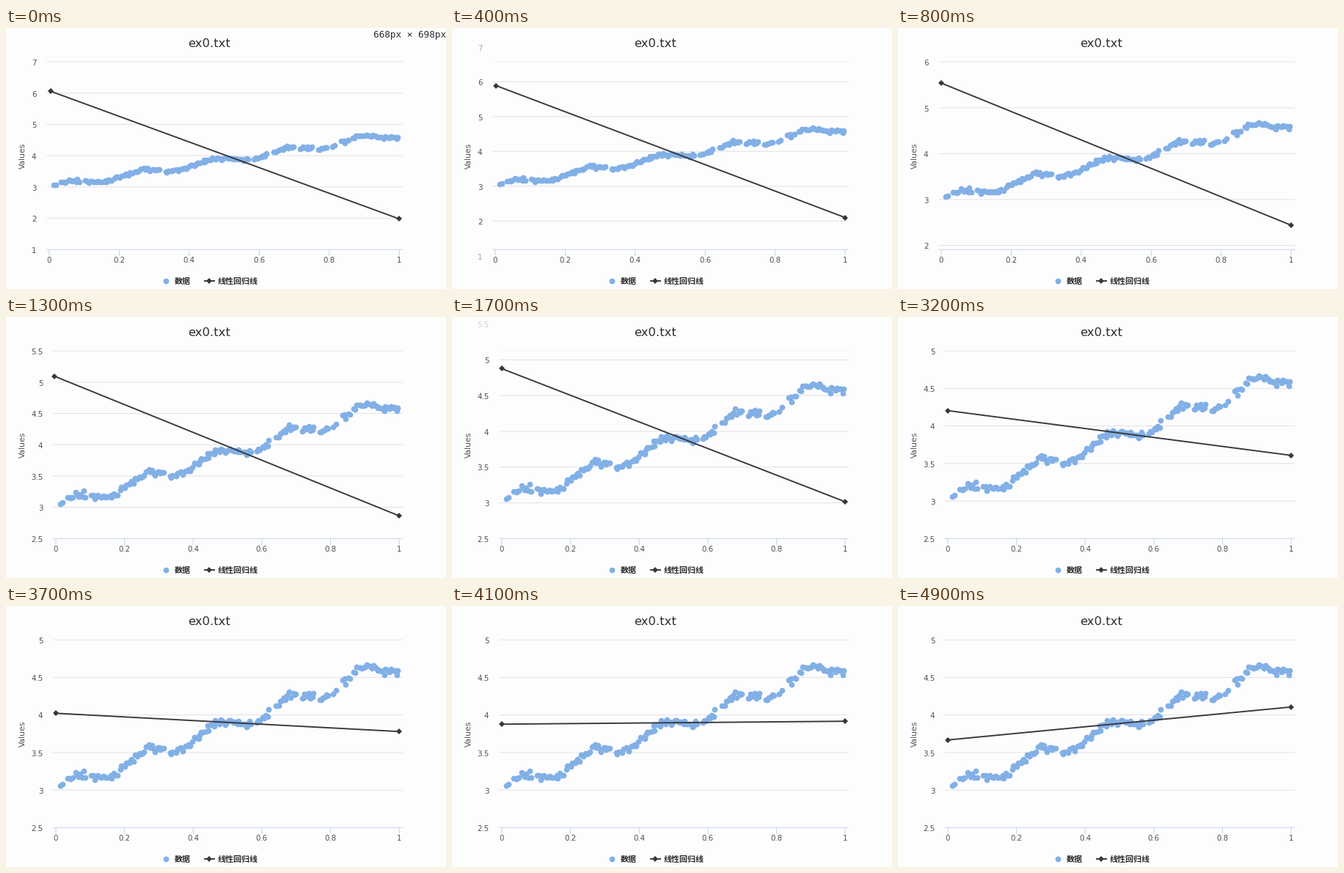
A matplotlib script for the animation above (5000 ms loop, 600x356 px).

```python
import numpy as np
import matplotlib.pyplot as plt
from matplotlib.animation import FuncAnimation

W, H, DPI = 600, 356, 100
FRAMES, STEP = 50, 100
PT = 72 / DPI
TOP, BOTTOM, RIGHT = 46.2, 302.2, 536.2
BLUE, DARK, INK = "#82b0e6", "#37373c", "#2d2d30"
GREY, GRID, AXIS, PAPER = "#505054", "#e2e2e6", "#c6d3ea", "#fdfdfe"

# Empty stretches of the cloud, as x positions on the stage
GAPS = [(77, 83), (109, 115), (216, 223), (335, 341), (360, 366),
        (398, 403), (420, 427), (441, 446), (451, 458), (469, 473)]

# Regression line: time in seconds, value at x = 0, value at x = 1
LINE_KEYS = [(0, 6.06, 1.98), (0.4, 5.89, 2.10), (1.3, 5.096, 2.863),
             (2.3, 4.546, 3.242), (3.2, 4.204, 3.608), (4.1, 3.877, 3.916),
             (4.9, 3.667, 4.106)]
LINE_T, LINE_LEFT, LINE_RIGHT = zip(*LINE_KEYS)


def make_cloud():
    """A rising sine wave with a little noise and a few gaps."""
    rng = np.random.default_rng(11)
    px = np.linspace(74.5, 534.5, 190)
    px += rng.uniform(-1, 1, px.size)
    for start, end in GAPS:
        px = px[(px < start) | (px > end)]
    x = (px - 68) / (RIGHT - 68)
    noise = np.clip(rng.normal(0, 0.028, x.size), -0.055, 0.055)
    return x, 3.005 + 1.7 * x + 0.1 * np.sin(30 * x) + noise


CLOUD_X, CLOUD_Y = make_cloud()


def ramp(t, start, end):
    return float(np.clip((t - start) / (end - start), 0, 1))


def zoom(t):
    """Progress of the change from whole to half steps on the y axis."""
    return ramp(t, 0.9, 1.25)


def axis_range(t):
    low = 1 + ramp(t, 0.3, 0.85) + 0.5 * zoom(t)
    high = 7 - ramp(t, 0.1, 0.8) - 0.5 * zoom(t) - 0.5 * ramp(t, 1.4, 1.8)
    return low, high


def tick_alpha(value, t):
    if value in (1, 7):
        return 1 - ramp(t, 0.2, 0.6)
    if value in (2, 6):
        return 1 - zoom(t)
    if value == 5.5:
        return zoom(t) * (1 - ramp(t, 1.4, 1.8))
    if value % 1:
        return zoom(t) if 2.5 <= value <= 5 else 0
    return 1


fig = plt.figure(figsize=(W / DPI, H / DPI), dpi=DPI, facecolor=PAPER)
ax = fig.add_axes([0, 0, 1, 1])


def text(x, y, s, px, color=GREY, font="DejaVu Sans", ha="center", **kw):
    ax.text(x, y, s, fontsize=px * PT, color=color, family=font, ha=ha,
            va=kw.pop("va", "baseline"), **kw)


def line(xs, ys, color, width=1, **kw):
    ax.plot(xs, ys, color=color, lw=width * PT, solid_capstyle="butt",
            snap=False, **kw)


def marks(xs, ys, shape, size, color, z):
    ax.plot(xs, ys, ls="", marker=shape, ms=size * PT, mew=0, color=color,
            zorder=z, snap=False)


def dots(xs, ys):
    marks(xs, ys, "o", 7.8, BLUE, 4)


def diamond_line(xs, ys, marks_x, marks_y):
    line(xs, ys, DARK, 1.9, zorder=5)
    marks(marks_x, marks_y, "D", 5.2, DARK, 6)


def draw_axes(t, left, to_y):
    for value in np.arange(1, 7.5, 0.5):
        alpha = tick_alpha(value, t)
        if alpha <= 0:
            continue
        y = to_y(value)
        grid_y = np.clip(y, TOP, BOTTOM)
        if grid_y < BOTTOM:
            line([left - 4, 541], [grid_y] * 2, GRID, alpha=alpha)
        text(left - 17.7, y + 4.8, f"{value:g}", 10.2, ha="right", alpha=alpha)
    line([left - 4, 541], [BOTTOM] * 2, AXIS, zorder=3)
    for value in np.linspace(0, 1, 6):
        x = left + value * (RIGHT - left)
        line([x, x], [BOTTOM, 311], AXIS, zorder=3)
        text(x, 320, f"{value:g}", 10.2)


def draw_legend():
    cjk = dict(font="Noto Sans CJK JP", ha="left", weight="bold")
    dots([217.8], [345])
    text(230, 349, "数据", 11, INK, **cjk)
    diamond_line([270, 285], [345, 345], [277.3], [345])
    text(289, 349, "线性回归线", 11, INK, **cjk)


def draw(i):
    t = i * STEP / 1000
    ax.clear()
    ax.set(xlim=(0, W), ylim=(H, 0))
    ax.axis("off")

    low, high = axis_range(t)
    left = 59 + 9 * zoom(t)

    def to_y(value):
        return BOTTOM - (value - low) / (high - low) * (BOTTOM - TOP)

    draw_axes(t, left, to_y)
    dots(left + CLOUD_X * (RIGHT - left), to_y(CLOUD_Y))

    # The line's first marker trails the shift of the plot edge
    start_x = 61 - 2 * ramp(t, 0, 0.8) + 9 * ramp(t, 1, 1.4)
    xs = [start_x, RIGHT]
    ys = [to_y(np.interp(t, LINE_T, ends)) for ends in (LINE_LEFT, LINE_RIGHT)]
    diamond_line(xs, ys, xs, ys)

    text(277.2, 25.5, "ex0.txt", 16.4, INK)
    text(22.7, 174.5, "Values", 10.8, rotation=90, va="center")
    draw_legend()
    if t < 0.2:
        text(600, 13, "668px × 698px", 12.8, INK, "DejaVu Sans Mono", "right")
    return []


anim = FuncAnimation(fig, draw, frames=FRAMES, interval=STEP,
                     init_func=lambda: [], repeat=True, repeat_delay=0)
plt.show()
```
